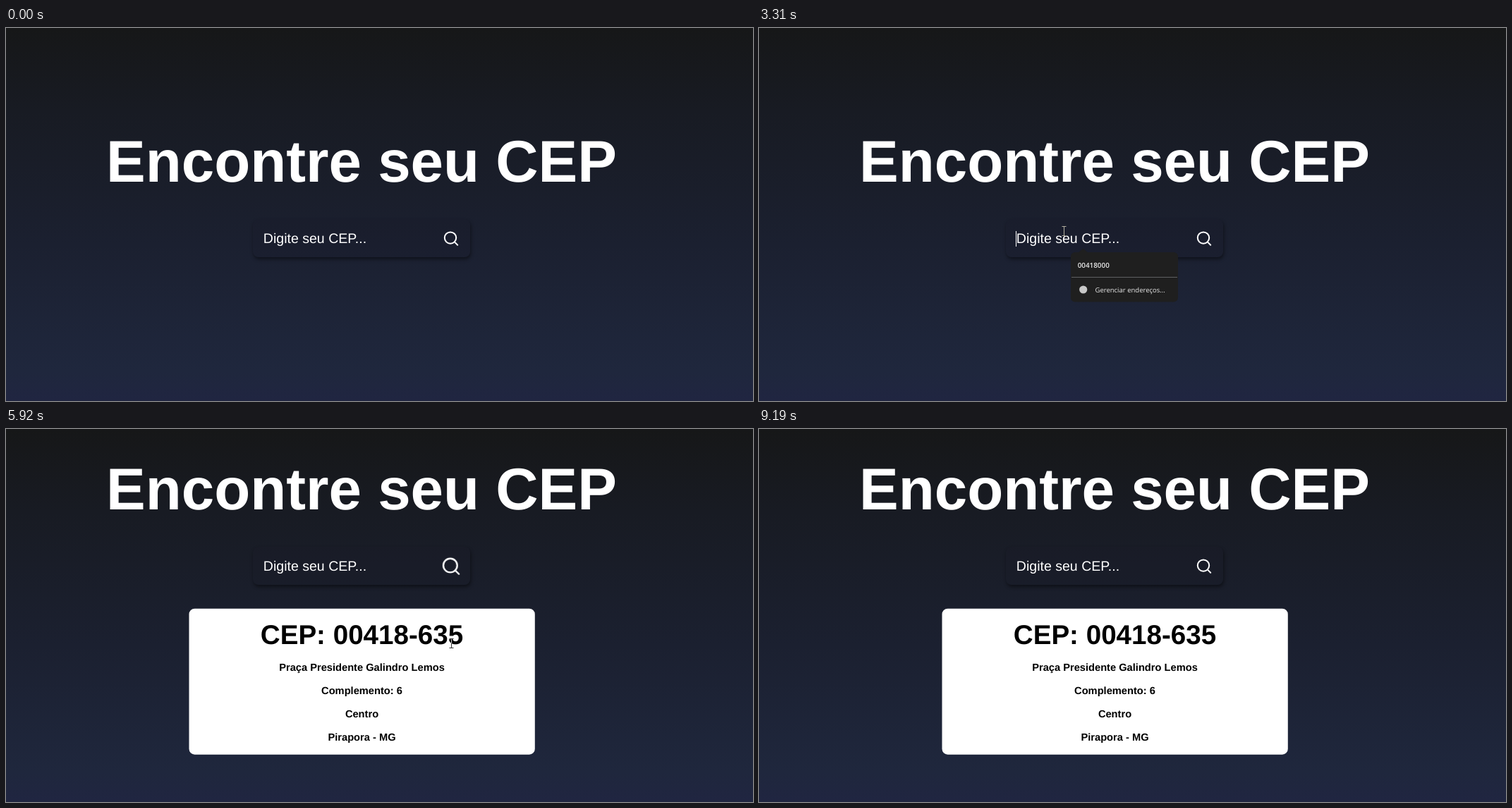
An HTML page that plays this animation: 1059x529 px, repeating every 9.59 s.

```html
<!DOCTYPE html>
<html lang="pt-BR">
<head>
<meta charset="utf-8">
<title>Encontre seu CEP</title>
<style>
html, body { margin: 0; width: 100%; height: 100%; overflow: hidden; }
.stage {
  position: absolute; left: 0; top: 0; width: 1059px; height: 529px; overflow: hidden;
  background: linear-gradient(#161718, #181b23 22%, #1b2030 58%, #1f273d 92%, #202541);
  font-family: "Liberation Sans", Arial, sans-serif;
}
svg { position: absolute; left: 0; top: 0; overflow: visible; text-rendering: geometricPrecision; }
.head { position: absolute; left: 0; top: 0; width: 1059px; height: 529px; }
.field {
  position: absolute; left: 350px; top: 271px; width: 308px; height: 54px; border-radius: 8px;
  background: rgba(28, 26, 42, .2); box-shadow: 1px 3px 5px rgba(0, 0, 0, .45);
}
.mid { text-anchor: middle; font-weight: bold; }
.title { font-size: 83.5px; }
.input { font-size: 19.56px; }
.code { font-size: 38.6px; }
.line { font-size: 14.67px; }
.menu { font-family: "Open Sans", "Noto Sans", sans-serif; fill: #e8e8e8; }
.icon { fill: none; stroke: #fff; stroke-width: 2; stroke-linecap: round; transform-origin: 631px 298.5px; }
.beam { fill: none; stroke: #ccc; mix-blend-mode: difference; }

/* Every part shares one looping clock */
.head, .hint, .typed, .drop, .caret, .caret-end, .icon, .card, .pointer {
  animation: 9590ms step-end infinite;
}
.head { animation-name: lift; }
.hint { animation-name: hint; }
.typed { animation-name: typed; }
.drop { animation-name: drop; }
.caret { animation-name: caret; }
.caret-end { animation-name: caret-end; }
.icon { animation-name: hover; }
.card { animation-name: card; }
.arrow { animation-name: path, arrow; }
.beam { animation-name: path, beam; }
.hand { animation-name: path, hand; }
.press { animation-name: path, press; }

@keyframes lift { 0% { transform: none; } 61.73%, 100% { transform: translateY(-104px); } }
@keyframes card { 0% { opacity: 0; } 61.73%, 100% { opacity: 1; } }
@keyframes hint { 0%, 61.73%, 100% { opacity: 1; } 40.77% { opacity: 0; } }
@keyframes typed { 0%, 61.73%, 100% { opacity: 0; } 40.77% { opacity: 1; } }
@keyframes drop { 0%, 40.77%, 100% { opacity: 0; } 18.66% { opacity: 1; } }
@keyframes caret { 0%, 24.19%, 35.24%, 100% { opacity: 0; } 18.66%, 29.71% { opacity: 1; } }
@keyframes caret-end { 0%, 46.29%, 57.35%, 100% { opacity: 0; } 40.77%, 51.82% { opacity: 1; } }
@keyframes hover {
  0% { transform: scale(1); }
  55.26% { transform: scale(1); animation-timing-function: ease; }
  60.37% { transform: scale(1.2); }
  61.73% { transform: scale(1.2); animation-timing-function: ease; }
  66.83%, 100% { transform: scale(1); }
}
@keyframes arrow {
  0%, 10.74%, 73.93%, 95.82%, 100% { opacity: 0; }
  3.44%, 70.38%, 76.12% { opacity: 1; }
}
@keyframes beam {
  0%, 55.26%, 70.38%, 76.12%, 100% { opacity: 0; }
  10.74%, 61.73%, 73.93% { opacity: 1; }
}
@keyframes hand { 0%, 61.73%, 100% { opacity: 0; } 55.26% { opacity: 1; } }
@keyframes press { 0%, 19.39%, 61.73%, 100% { opacity: 0; } 17.93%, 59.64% { opacity: 1; } }

/* Pointer moves in 70 ms steps, as a screen recording does */
@keyframes path {
  0% { transform: translate(903px, 520px); }
  3.44% { transform: translate(903px, 520px); animation-timing-function: steps(4); }
  6.36% { transform: translate(770px, 455px); animation-timing-function: steps(4); }
  9.28% { transform: translate(560px, 352px); animation-timing-function: steps(2); }
  10.74% { transform: translate(478px, 312px); animation-timing-function: steps(3); }
  12.93% { transform: translate(411px, 285px); animation-timing-function: steps(7); }
  17.93% { transform: translate(432px, 295px); }
  22.83% { transform: translate(432px, 294px); }
  34.51% { transform: translate(432px, 288px); }
  37.33% { transform: translate(436px, 294px); }
  38.06% { transform: translate(440px, 298px); }
  42.96% { transform: translate(440px, 298px); animation-timing-function: steps(10); }
  50.15% { transform: translate(468px, 302px); animation-timing-function: steps(6); }
  54.53% { transform: translate(575px, 316px); }
  55.26% { transform: translate(618px, 319px); animation-timing-function: steps(6); }
  59.64% { transform: translate(631px, 304px); }
  68.19% { transform: translate(631px, 304px); animation-timing-function: steps(4); }
  71.11% { transform: translate(562px, 249px); animation-timing-function: steps(5); }
  74.66% { transform: translate(386px, 286px); animation-timing-function: steps(2); }
  76.12% { transform: translate(425px, 318px); animation-timing-function: steps(3); }
  78.31% { transform: translate(468px, 319px); animation-timing-function: steps(6); }
  82.69% { transform: translate(528px, 351px); animation-timing-function: steps(3); }
  84.88% { transform: translate(538px, 411px); animation-timing-function: steps(5); }
  88.53% { transform: translate(549px, 295px); animation-timing-function: steps(4); }
  91.44% { transform: translate(690px, 345px); animation-timing-function: steps(5); }
  95.09%, 100% { transform: translate(985px, 517px); }
}
</style>
</head>
<body>
<div class="stage">
  <div class="head">
    <div class="field"></div>
    <svg width="1059" height="529" fill="#fff">
      <text class="mid title" x="504" y="218">Encontre seu CEP</text>
      <text class="input hint" x="364.8" y="305">Digite seu CEP...</text>
      <text class="input typed" x="365" y="305">00418635</text>
      <rect class="caret" x="364" y="288" width="1" height="22"/>
      <rect class="caret-end" x="452" y="288" width="1" height="22"/>
      <g class="icon">
        <circle cx="630" cy="297.6" r="8.2"/>
        <path d="M640.2 307.8l-4.4-4.4"/>
      </g>
    </svg>
  </div>

  <svg class="drop" width="1059" height="529">
    <path d="M452 319l7.5-6 7.5 6z" fill="#1f1f1f"/>
    <rect x="442" y="318" width="152" height="70.5" rx="6" fill="#1f1f1f"/>
    <path d="M443 353.5h150" stroke="#5f6062"/>
    <g class="menu">
      <text x="451.7" y="339.8" font-size="9.9" font-weight="600">00418000</text>
      <text x="476.5" y="374.8" font-size="9.5">Gerenciar endereços...</text>
    </g>
    <circle cx="459.7" cy="371" r="5.6" fill="#c8c8c8"/>
  </svg>

  <svg class="card" width="1059" height="529">
    <rect x="259.5" y="254.7" width="490.3" height="207" rx="8" fill="#fff"/>
    <text class="mid code" x="504.5" y="305.3">CEP: 00418-635</text>
    <g class="mid line">
      <text x="504.5" y="343">Praça Presidente Galindro Lemos</text>
      <text x="504.5" y="376">Complemento: 6</text>
      <text x="504.5" y="409">Centro</text>
      <text x="504.5" y="442">Pirapora - MG</text>
    </g>
  </svg>

  <svg class="pointer press" width="1" height="1">
    <circle cx="-1" cy="-.7" r="9.7" fill="#ffee00" fill-opacity=".56"/>
  </svg>
  <svg class="pointer beam" width="1" height="1">
    <path d="M-2.5-6.5h6M.5-6.5v13M-2.5 6.5h6"/>
  </svg>
  <svg class="pointer arrow" width="1" height="1">
    <path d="M.5 0V13.5L3.6 10.6 5.7 15.5 7.8 14.6 5.8 9.8H9.8Z" fill="#fff" stroke="#111" stroke-width=".9"/>
  </svg>
  <svg class="pointer hand" width="1" height="1">
    <path d="M-2.5.5a1.5 1.5 0 0 1 3 0V6l6 1.2q1.7.4 1.7 2V12.5L6.7 17.3H-.8L-6.2 10.8q-.8-2 1.2-2L-2.5 10.4Z"
      fill="#fff" stroke="#222" stroke-width=".8"/>
  </svg>
</div>
</body>
</html>
```
